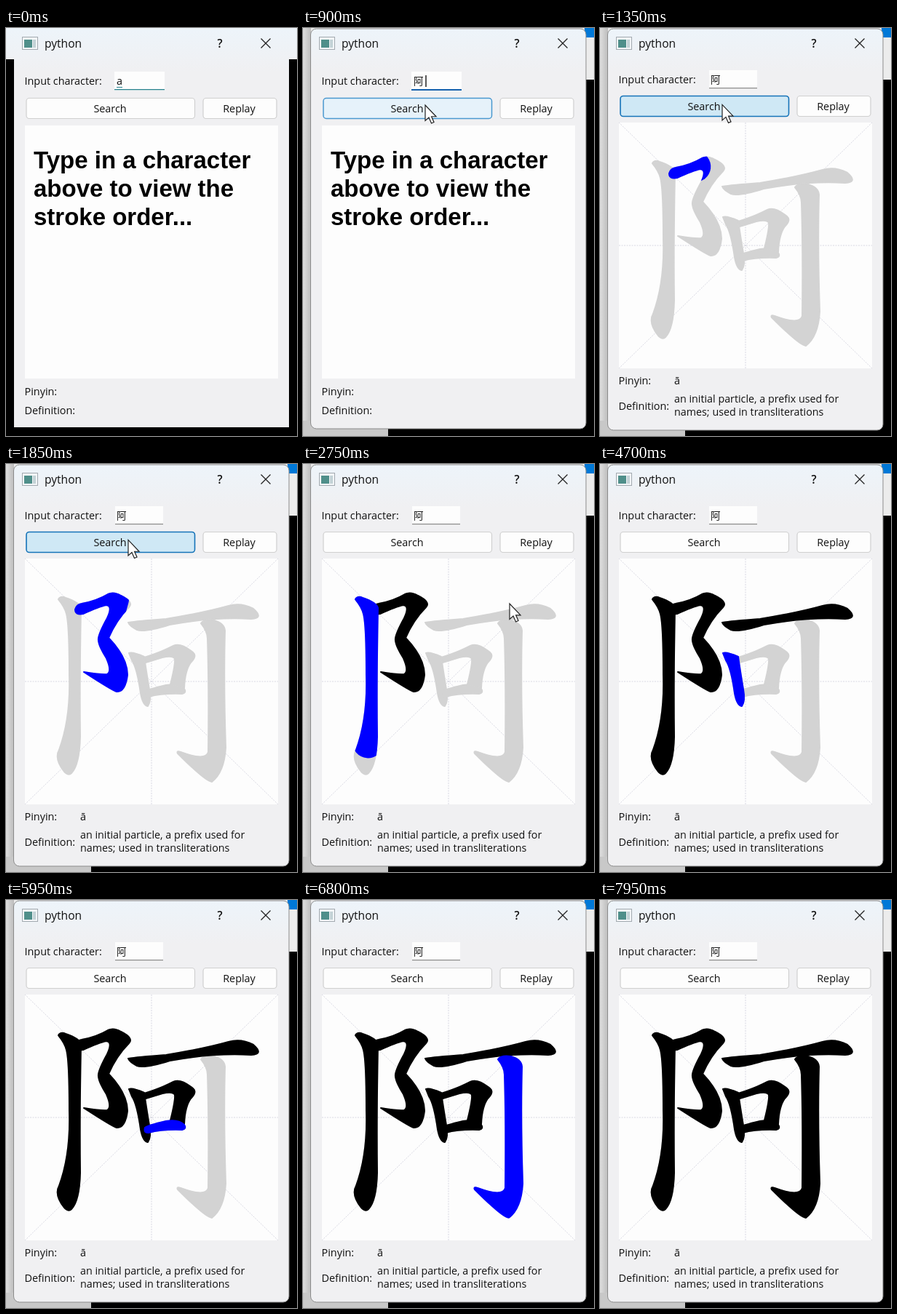
Recreate the animation shown at these times as an HTML page. Size 400 px wide and 561 px high, loop 8 s.

```html
<!DOCTYPE html>
<html lang="en">
<head>
<meta charset="utf-8">
<title>Stroke order</title>
<style>
  html, body { margin: 0; width: 100%; height: 100%; overflow: hidden; background: #000; }
  svg { display: block; width: 100vw; height: 100vh; }
  text { font: 14.4px "Open Sans", "Noto Sans", sans-serif; fill: #111; }
  .title { font-size: 15.6px; }
  .body { font-size: 14.3px; }
  .mid { text-anchor: middle; }
  .hanzi { font: 500 13.5px "Noto Sans CJK SC", "Noto Sans CJK", sans-serif; }
  .big { font: bold 33px "Liberation Sans", Arial, sans-serif; fill: #000; }
  .button { fill: #fdfdfd; stroke: #d0d0d0; stroke-width: 1.2; }
  .hover { fill: #e6f2fa; stroke: #4a98cf; stroke-width: 1.5; }
  .active { fill: #cfe8f5; stroke: #1673b8; stroke-width: 1.6; }
  .grid { fill: none; stroke: #d8d8e2; stroke-dasharray: 2 1.5; }
  .shape { stroke-width: 2; stroke-linejoin: round; }
  .ghost { fill: #d3d3d3; stroke: #d3d3d3; }
  .ink { fill: #000; stroke: #000; }
  .hole { fill: #fff; stroke: #fff; }
  .trace { fill: none; stroke: #00f; stroke-width: 42; stroke-linecap: round; stroke-linejoin: round; }
</style>
</head>
<body>
<svg viewBox="0 0 400 561" preserveAspectRatio="none">
  <defs>
    <linearGradient id="shade">
      <stop offset="0" stop-color="#dedede"/><stop offset="1" stop-color="#bcbcbc"/>
    </linearGradient>
    <linearGradient id="pane" gradientUnits="userSpaceOnUse" x1="0" y1="0" x2="0" y2="60">
      <stop offset="0" stop-color="#edf4fa"/><stop offset="1" stop-color="#f0f0f2"/>
    </linearGradient>
  </defs>

  <!-- bare window, first moment -->
  <g id="bare">
    <rect width="400" height="561"/>
    <path d="M0 0H400V43H389V549H11V43H0Z" fill="url(#pane)"/>
  </g>

  <!-- window on the desktop -->
  <g id="desktop">
    <rect width="400" height="561"/>
    <rect width="400" height="71" fill="#ececec"/>
    <rect x="387" width="13" height="13" fill="#0078d7"/>
    <rect width="11" height="561" fill="url(#shade)"/>
    <rect y="540" width="117" height="21" fill="#c8c8c8"/>
    <rect id="frame" x="10.5" y="1" width="378.5" height="550" rx="8" fill="url(#pane)" stroke="#8c8c8c"/>
  </g>

  <g>
    <rect x="22.5" y="12.5" width="21" height="17" fill="#f2f5f7" stroke="#a3aab0"/>
    <rect x="25" y="16" width="11" height="11" fill="#4f8f8a"/>
    <rect x="37" y="16" width="4" height="11" fill="#c3d2d6"/>
    <text class="title" x="53" y="27">python</text>
    <text class="title mid" x="294" y="27" style="font-weight:600">?</text>
    <path d="M350.5 14.5l13 13m0-13l-13 13" stroke="#222" stroke-width="1.3"/>
  </g>

  <g id="inputRow">
    <text x="25.5" y="78">Input character:</text>
    <rect id="field" x="149" y="60" width="69" height="26" fill="#fdfdfd"/>
    <rect id="fieldLine" x="149" y="84" width="69" height="2"/>
    <g id="typing">
      <text x="152" y="78">a</text>
      <path d="M152 81.5h8" stroke="#27808c"/>
    </g>
    <text id="typed" class="hanzi" x="152" y="78">阿</text>
    <path id="caret" d="M169 65v16" stroke="#000" stroke-width="1.3"/>
  </g>

  <g id="buttons">
    <rect id="search" class="button" x="28" y="96.5" width="231.5" height="28" rx="4"/>
    <text class="mid" x="143" y="116">Search</text>
    <rect class="button" x="271" y="96.5" width="101" height="28" rx="4"/>
    <text class="mid" x="320.5" y="116">Replay</text>
  </g>

  <g id="prompt">
    <rect x="26" y="134" width="348" height="348" fill="#fdfdfd"/>
    <text class="big" x="38" y="193">Type in a character</text>
    <text class="big" x="38" y="232">above to view the</text>
    <text class="big" x="38" y="271">stroke order...</text>
    <text x="25.5" y="505">Pinyin:</text>
    <text x="25.5" y="531">Definition:</text>
  </g>

  <g id="result">
    <rect x="26" y="130" width="348" height="338" fill="#fdfdfd"/>
    <path class="grid" d="M200 130V468M26 299H374M26 130L374 468M374 130L26 468"/>
    <g id="strokes"></g>
    <text x="25.5" y="490">Pinyin:</text>
    <text x="102" y="490">ā</text>
    <text x="25.5" y="525">Definition:</text>
    <text class="body" x="102" y="515">an initial particle, a prefix used for</text>
    <text class="body" x="102" y="533">names; used in transliterations</text>
  </g>

  <path id="cursor" d="M0 0V21.5L5 17L8.5 25L12 23.5L8.6 15.8H15Z" fill="#fff" stroke="#222" stroke-width="1.2"/>
</svg>

<script>
const LOOP = 8000, DESKTOP = 50, COMMIT = 450, PRESS = 1050, RESULT = 1160;
const SPEED = 0.406, PEN = 42, PAUSE = 102;   // px per ms, px, px

// Each stroke: outline, then the centre line the pen follows.
const strokeShapes = [
  ["M95 200Q97 193 104 192Q125 188 140 179Q148 175 158 181Q176 190 169 197Q152 214 141 239Q167 266 167 290Q164 314 152 313Q147 312 107 286Q133 290 139 289Q146 285 138 267Q126 248 127 240Q128 232 139 212Q147 195 138 194Q128 196 106 206Q95 208 95 200Z",
   "M97 200L148 186L133 240L155 285L150 300L108 287"],
  ["M72 186Q75 181 82 184Q102 191 103 198Q101 300 102 375Q101 414 90 425Q86 429 80 423Q66 405 73 393Q89 350 87 290Q87 220 83 206Q81 197 72 186Z",
   "M84 187L94 205L92 350L86 424"],
  ["M168 218Q180 216 220 213Q270 205 306 195Q323 190 340 199Q355 212 337 213Q285 210 225 221Q190 232 180 228Q170 223 168 218Z",
   "M172 220L340 206"],
  ["M169 260Q174 258 190 265Q192 280 197 310Q200 326 195 333Q188 332 185 315Q180 280 173 270Z",
   "M175 263L193 330"],
  ["M190 266Q215 258 230 250Q240 245 257 259Q263 264 254 273Q246 284 245 308Q238 312 226 303Q233 275 232 268Q230 263 215 266L192 273Z",
   "M193 269L243 258L236 305"],
  ["M191 313Q194 310 220 304Q237 301 245 309Q249 314 242 316Q215 315 196 320Q189 321 191 313Z",
   "M194 317L244 311"],
  ["M268 219Q272 213 286 215Q300 219 301 229Q299 300 302 390Q300 424 283 437Q275 437 236 398Q234 394 240 396Q275 409 278 396Q279 300 277 240Q277 230 268 219Z",
   "M272 219L289 228L290 405L280 417L240 397"]
];

// Pointer keys: time, x, y of the tip.
const pointerKeys = [[500, 232, 190], [800, 168, 106], [2300, 168, 104], [2700, 284, 192], [4300, 284, 192], [4650, 405, 330]];

const $ = id => document.getElementById(id);
const show = (node, on) => node.style.display = on ? "" : "none";
const set = (node, attrs) => { for (const k in attrs) node.setAttribute(k, attrs[k]); };

// All pale shapes lie below every inked one.
const ghosts = strokeShapes.map(([outline]) => `<path class="shape ghost" d="${outline}"/>`);
const inked = strokeShapes.map(([outline, line], i) =>
  `<mask id="mask${i}" maskUnits="userSpaceOnUse" x="0" y="0" width="400" height="561">
     <path class="shape hole" d="${outline}"/>
   </mask>
   <path class="shape ink" d="${outline}"/>
   <g mask="url(#mask${i})"><path class="trace" d="${line}"/></g>`);
$("strokes").innerHTML = ghosts.join("") + inked.join("");

const inks = document.querySelectorAll(".ink");
let clock = RESULT;
const strokes = [...document.querySelectorAll(".trace")].map((trace, i) => {
  const length = trace.getTotalLength();
  const start = clock;
  clock += (length + 2 * PEN + PAUSE) / SPEED;
  return { ink: inks[i], trace, length, start, end: clock };
});

function pointerAt(t) {
  const next = pointerKeys.findIndex(key => key[0] > t);
  if (next < 1) return null;
  const [t0, x0, y0] = pointerKeys[next - 1], [t1, x1, y1] = pointerKeys[next];
  const u = (t - t0) / (t1 - t0), ease = u * u * (3 - 2 * u);
  return [x0 + (x1 - x0) * ease, y0 + (y1 - y0) * ease];
}

function draw(t) {
  const found = t >= RESULT, committed = t >= COMMIT, desktop = t >= DESKTOP;
  show($("bare"), !desktop);
  show($("desktop"), desktop);
  set($("frame"), { height: found ? 552 : 550 });
  show($("prompt"), !found);
  show($("result"), found);

  show($("typing"), !committed);
  show($("typed"), committed);
  show($("caret"), committed && t < PRESS);
  set($("inputRow"), { transform: `translate(0 ${found ? -2 : 0})` });
  set($("buttons"), { transform: `translate(0 ${found ? -3 : 0})` });
  const box = found ? { x: 150, width: 66 } : { x: 149, width: 69 };
  set($("field"), box);
  set($("fieldLine"), {
    ...box,
    height: committed && !found ? 2 : 1.3,
    fill: found ? "#8a8a8a" : committed ? "#1560ad" : "#27808c"
  });

  const pointer = pointerAt(t);
  show($("cursor"), pointer);
  if (pointer) set($("cursor"), { transform: `translate(${pointer})` });
  const over = pointer && pointer[0] < 260 && pointer[1] < 124;
  set($("search"), { class: "button" + (over ? t < PRESS ? " hover" : " active" : "") });

  for (const { ink, trace, length, start, end } of strokes) {
    const head = Math.min(length, (t - start) * SPEED - PEN);   // the pen starts one width early
    show(ink, t >= end);
    show(trace, head > 0 && t < end);
    set(trace, { "stroke-dasharray": `${Math.max(0, head)} ${length * 2}` });
  }
}

const begin = performance.now();
function tick() {
  draw((performance.now() - begin) % LOOP);
  requestAnimationFrame(tick);
}
tick();
</script>
</body>
</html>
```
